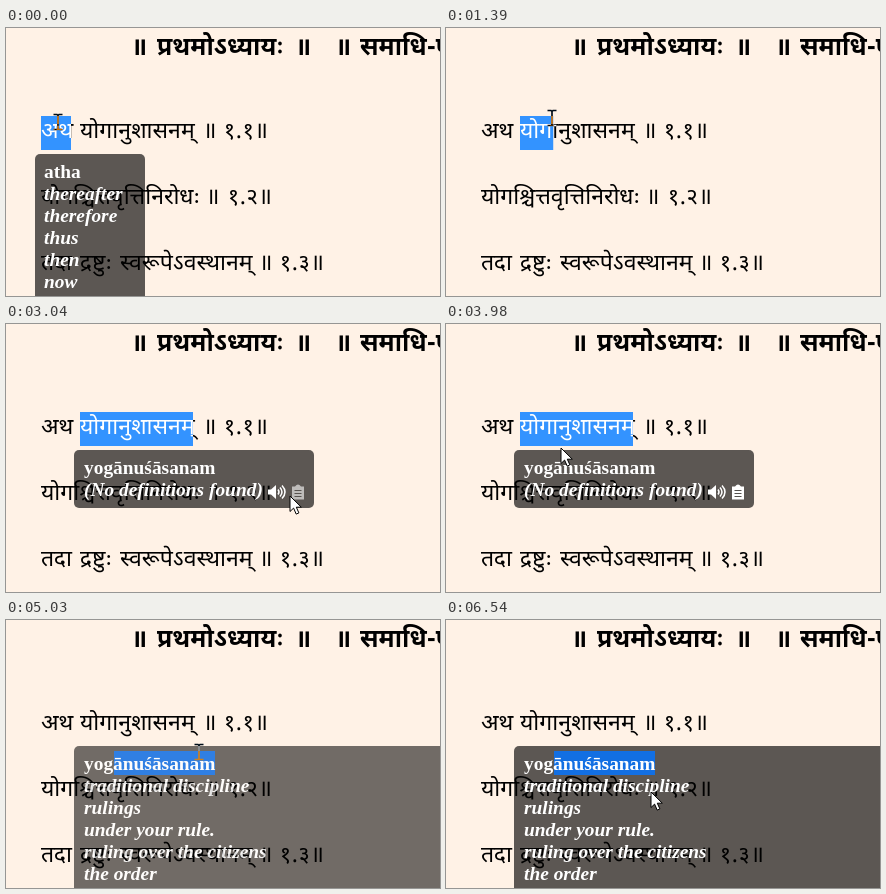
An HTML page that plays this animation: 434 by 268 pixels, repeating every 7.73 s.

```html
<!DOCTYPE html>
<html lang="sa">
<head>
<meta charset="utf-8">
<style>
html, body { margin: 0; width: 100%; height: 100%; overflow: hidden; background: #fff2e6; }
svg { display: block; position: absolute; left: 0; top: 0; }
text { white-space: pre; }
.verse { font: 400 23px "Noto Sans Devanagari", "Noto Serif Devanagari", "Noto Sans", sans-serif; }
.head { font: 700 25px "Noto Sans Devanagari", "Noto Serif Devanagari", "Noto Sans", sans-serif; }
.tip { font: 700 19.4px "Liberation Serif", "Noto Serif", serif; fill: #fff; }
.def { font-style: italic; }
#beam { mix-blend-mode: difference; }
</style>
</head>
<body>
<svg width="434" height="268" viewBox="0 0 434 268">
  <defs>
    <g id="page"></g>
    <clipPath id="selClip"><rect id="selClipBox" y="88" height="34"/></clipPath>
  </defs>
  <rect width="434" height="268" fill="#fff2e6"/>
  <use href="#page" fill="#000"/>
  <rect id="sel" y="88" height="34" fill="#3393ff"/>
  <use href="#page" fill="#fff" clip-path="url(#selClip)"/>
  <g id="popup">
    <rect id="box" y="126" rx="5" fill="#000" fill-opacity=".64"/>
    <rect id="titleSel" x="108" y="131" height="24" fill="#126fe3"/>
    <text id="title" class="tip" y="150"></text>
    <g id="defs"></g>
    <g id="icons" fill="#fff">
      <path d="M0 5h3l5-4.500v14L3 10H0z"/>
      <path d="M10 5q2 2.500 0 5M12 3q4 4.500 0 9M14 1q6 6.500 0 13" fill="none" stroke="#fff" stroke-width="1.500"/>
      <g id="clipboard">
        <path d="M24 2h3q3-4 6 0h3v13H24z"/>
        <path d="M26.500 6h7M26.500 9h7M26.500 12h7" stroke="#55524e"/>
      </g>
    </g>
  </g>
  <path id="beam" d="M-4.500-7.500h3.500l1 1 1-1h3.500M0-6.500v13M-4.500 7.500h3.500l1-1 1 1h3.500" fill="none" stroke="#fff" stroke-width="1.700"/>
  <path id="arrow" d="M0 0v15.500l3.600-3.400 2.600 6 2.700-1.200-2.600-5.700h5z" fill="#fff" stroke="#000"/>
</svg>
<script>
const LOOP = 7730;
const $ = id => document.getElementById(id);

function addText(parent, text, x, y, cls) {
  const node = document.createElementNS("http://www.w3.org/2000/svg", "text");
  node.setAttribute("x", x);
  node.setAttribute("y", y);
  node.setAttribute("class", cls);
  node.textContent = text;
  parent.append(node);
}

function set(id, attrs) {
  for (const key in attrs) $(id).setAttribute(key, attrs[key]);
}

const show = (id, on) => set(id, { visibility: on ? "visible" : "hidden" });

// Each word starts at its own x.
const lines = [
  ["head", 27, [["॥", 125], ["प्रथमोऽध्यायः", 151], ["॥", 289], ["॥", 329], ["समाधि-पादः", 354]]],
  ["verse", 110, [["अथ", 35], ["योगानुशासनम्", 74], ["॥", 197], ["१.१॥", 217]]],
  ["verse", 176, [["योगश्चित्तवृत्तिनिरोधः", 35], ["॥", 200], ["१.२॥", 221]]],
  ["verse", 242, [["तदा", 35], ["द्रष्टुः", 74], ["स्वरूपेऽवस्थानम्", 114], ["॥", 253], ["१.३॥", 273]]]
];
for (const [cls, y, words] of lines)
  for (const [word, x] of words) addText($("page"), word, x, y, cls);

const none = ["(No definitions found)"];
const atha = ["thereafter", "therefore", "thus", "then", "now", "here"];
const discipline = ["traditional discipline", "rulings", "under your rule.", "ruling over the citizens", "the order"];

// Linear interpolation through [time, ...values] keys.
function track(keys, t) {
  const next = keys.findIndex(key => key[0] > t);
  if (next === 0) return keys[0].slice(1);
  if (next < 0) return keys[keys.length - 1].slice(1);
  const a = keys[next - 1], b = keys[next];
  const p = (t - a[0]) / (b[0] - a[0]);
  return a.slice(1).map((v, i) => v + (b[i + 1] - v) * p);
}

const cursorPath = [
  [0, 52, 94], [650, 52, 94], [770, 71, 91], [980, 71, 91], [1010, 71, 90],
  [1200, 71, 90], [1700, 162, 90], [1820, 162, 90], [2030, 187, 90],
  [2630, 187, 90], [2760, 200, 115], [2900, 262, 160], [3040, 284, 172],
  [3230, 284, 172], [3430, 269, 158], [3650, 215, 115], [3850, 150, 108],
  [4050, 97, 132], [4220, 108, 133], [4310, 108, 133], [4760, 173, 132],
  [4900, 193, 132], [6020, 193, 132], [6190, 182, 146], [6540, 205, 172]
];
const pageSelection = [[1200, 74], [1700, 161], [1820, 161], [2030, 187]];
const titleSelection = [[4310, 108], [4760, 183], [4900, 209]];
const popupAlpha = [
  [0, 1], [1140, 1], [1170, .88], [1290, 0], [1560, 0], [1690, 1],
  [4980, 1], [5060, .8], [5150, .85], [5300, 1]
];

function popupState(t) {
  if (t < 1400) return { x: 29, w: 110, h: 160, title: "atha", defs: atha };
  const state = { x: 68, w: 240, h: 58, title: t < 1850 ? "yogānuśā" : "yogānuśāsanam", defs: none, icons: 262 };
  if (t >= 1850 && t < 2180) return { ...state, w: 151, defs: [], icons: 78 };
  if (t >= 5030) return { ...state, w: 380, h: 160, defs: discipline, icons: null };
  return state;
}

let shownDefs;
function drawPopup(t) {
  const { x, w, h, title, defs, icons } = popupState(t);
  const left = x + (x === 29 ? 9 : 10);
  set("popup", { opacity: track(popupAlpha, t)[0] });
  set("box", { x, width: w, height: h });
  set("title", { x: left });
  $("title").textContent = title;
  if (shownDefs !== defs) {
    $("defs").replaceChildren();
    defs.forEach((line, i) => addText($("defs"), line, left, 172 + 22 * i, "tip def"));
    shownDefs = defs;
  }
  show("icons", icons);
  if (icons) set("icons", { transform: `translate(${icons} 160.500)` });
  set("clipboard", { opacity: t >= 2980 && t < 3300 ? .6 : 1 });
  set("titleSel", { width: track(titleSelection, t)[0] - 108 });
}

function draw(t) {
  const first = t < 1140;
  const x = first ? 35 : 74;
  const end = first ? 65 : t < 4340 ? track(pageSelection, t)[0] : 74;
  for (const id of ["sel", "selClipBox"]) set(id, { x, width: end - x });
  drawPopup(t);

  const [cx, cy] = track(cursorPath, t).map(Math.round);
  const isArrow = (t > 2800 && t < 4030) || t > 6230;
  show("arrow", isArrow);
  show("beam", !isArrow);
  set(isArrow ? "arrow" : "beam", { transform: `translate(${cx} ${cy})` });
}

const start = performance.now();
function frame() {
  draw((performance.now() - start) % LOOP);
  requestAnimationFrame(frame);
}
frame();
</script>
</body>
</html>
```
